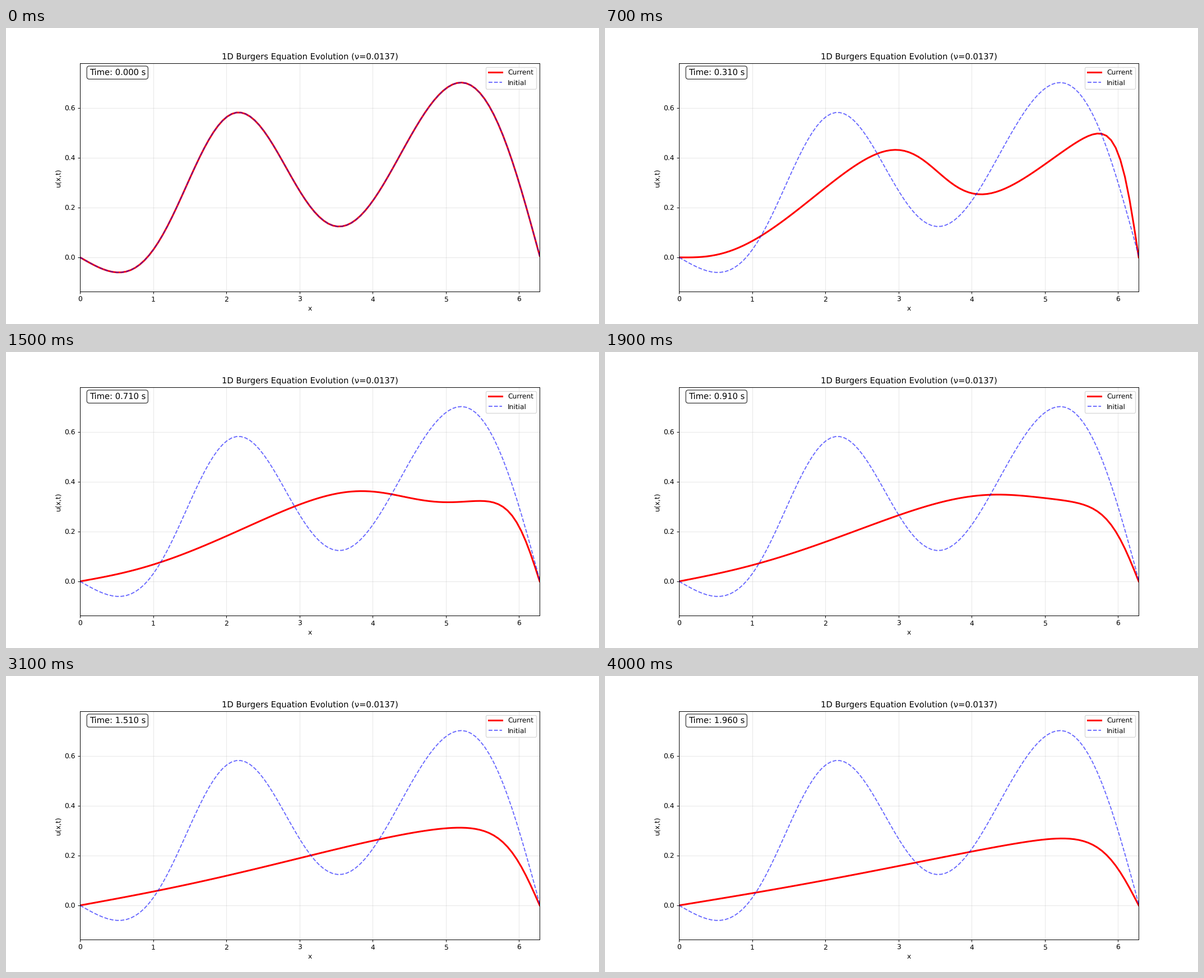
Recreate the animation shown at these times as a matplotlib script. Size 1058 by 529 pixels, loop 4.1 s.

```python
import numpy as np
import matplotlib.pyplot as plt
from matplotlib.animation import FuncAnimation

FRAMES = 41
INTERVAL = 100
LENGTH = 2 * np.pi
VISCOSITY = 0.0137
CELLS = 200
DT = 0.0005

# The flow lives on a unit interval; the axis shows it stretched to 2*pi.
SPEED = LENGTH
DIFFUSION = VISCOSITY * LENGTH**2

EXTREMA = [(0.54, -0.0606), (2.17, 0.583), (3.54, 0.124), (5.21, 0.7034)]
WAYPOINTS = [(1.08, 0.068), (1.485, 0.32), (2.7, 0.4185), (2.834, 0.353),
             (3.055, 0.243), (3.99, 0.2226), (5.76, 0.4995), (6.0, 0.3036)]
END_VALUE = 0.006

# Unhinted glyphs keep the natural letter spacing at this resolution.
plt.rcParams["text.hinting"] = "none"


def initial_profile(x, modes=9):
    """Smooth sine series through the extrema and close to the waypoints."""
    k = np.arange(1, modes + 1)
    drift = END_VALUE / LENGTH
    ex, ev = np.array(EXTREMA).T
    wx, wv = np.array(WAYPOINTS).T

    def sines(points):
        return np.sin(np.outer(points, k) / 2)

    slopes = k / 2 * np.cos(np.outer(ex, k) / 2)
    rows = np.vstack([5 * sines(ex), slopes, sines(wx), np.diag(5e-5 * k**2)])
    goal = np.concatenate([
        5 * (ev - drift * ex),
        np.full(len(ex), -drift),
        wv - drift * wx,
        np.zeros(modes),
    ])
    coeffs = np.linalg.lstsq(rows, goal, rcond=None)[0]
    return sines(x) @ coeffs + drift * x


def rate(u, dx):
    r = np.zeros_like(u)
    diffusion = DIFFUSION * (u[2:] - 2 * u[1:-1] + u[:-2]) / dx**2
    advection = SPEED * (u[2:]**2 - u[:-2]**2) / (4 * dx)
    r[1:-1] = diffusion - advection
    return r


def advance(u, dx, steps):
    for _ in range(steps):
        k1 = rate(u, dx)
        k2 = rate(u + DT * k1, dx)
        u = u + DT * (k1 + k2) / 2
    return u


def frame_time(i):
    return max(0.0, 0.05 * i - 0.04)


def solve(x):
    dx = x[1] - x[0]
    u = initial_profile(x)
    history = [u]
    u = u.copy()
    u[0] = u[-1] = 0
    for i in range(1, FRAMES):
        steps = round((frame_time(i) - frame_time(i - 1)) / DT)
        u = advance(u, dx, steps)
        history.append(u)
    return history


grid = np.linspace(0, LENGTH, CELLS + 1)
history = [u[::2] for u in solve(grid)]
x = grid[::2]

fig, ax = plt.subplots(figsize=(12, 6), dpi=1058 / 12)
current, = ax.plot(x, history[0], "r-", lw=2.5, label="Current")
ax.plot(x, history[0], "b--", lw=1.5, alpha=0.6, label="Initial")
ax.set_xlim(0, LENGTH)
ax.set_ylim(-0.137, 0.7798)
ax.set_xlabel("x")
ax.set_ylabel("u(x,t)")
ax.set_title(f"1D Burgers Equation Evolution (ν={VISCOSITY})")
ax.grid(True, alpha=0.3)
ax.legend(loc="upper right")
clock = ax.text(0.02, 0.95, "", transform=ax.transAxes, fontsize=12,
                bbox=dict(boxstyle="round", facecolor="white", alpha=0.8))


def update(i):
    current.set_ydata(history[i])
    clock.set_text(f"Time: {frame_time(i):.3f} s")
    return current, clock


anim = FuncAnimation(fig, update, frames=FRAMES, interval=INTERVAL, repeat=True)
plt.show()
```
